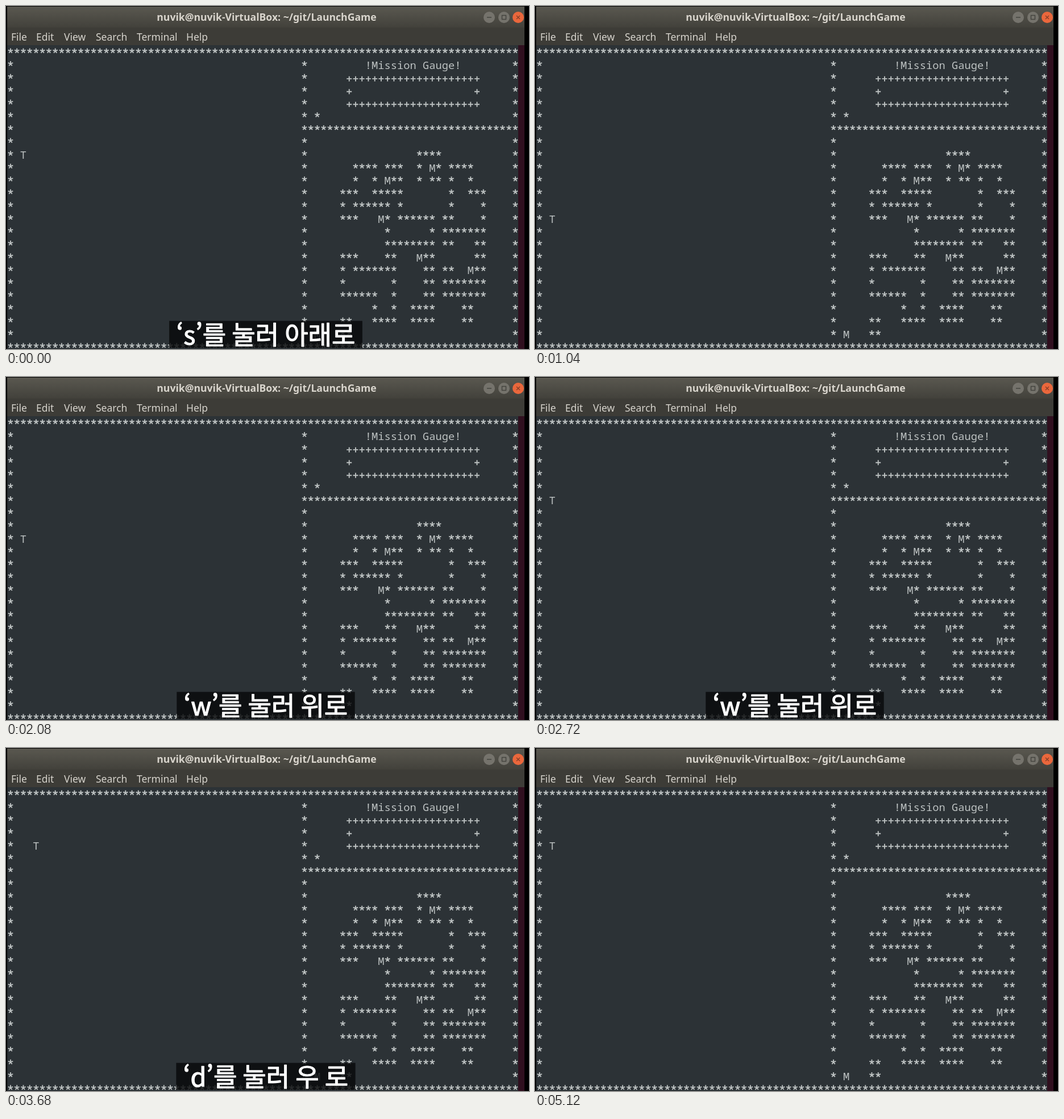
Recreate the animation shown at these times as an HTML page with a canvas. Size 920 by 604 pixels, loop 5.2 s.

```html
<!DOCTYPE html>
<html lang="ko">
<head>
<meta charset="utf-8">
<title>Terminal game</title>
<style>
  html, body { margin: 0; width: 100%; height: 100%; overflow: hidden; background: #000; }
  canvas { display: block; filter: blur(.65px); }
</style>
</head>
<body>
<canvas id="stage" width="920" height="612"></canvas>
<script>
const LOOP = 5200, COL = 11.24, ROW = 22.57;
const INK = '#bcc1c1';

// Rows 8 to 22 of the map, starting at column 52
const MAP = [
  '            ****',
  '  **** ***  * M* ****',
  '  *  * M**  * ** *  *',
  '***  *****       *  ***',
  '* ****** *       *    *',
  '***   M* ****** **    *',
  '       *      * *******',
  '       ******** **   **',
  '***    **   M**      **',
  '* *******    ** **  M**',
  '*       *    ** *******',
  '******  *    ** *******',
  '     *  *  ****    **',
  '**   ****  ****    **',
  '**',
];

// Key presses: time, column step, row step
const MOVES = [
  ...[160, 320, 480, 720, 960, 1120].map(t => [t, 0, 1]),
  ...[1280, 1520, 1760, 1920, 2080, 2320, 2560, 2720, 2880, 3120].map(t => [t, 0, -1]),
  ...[3360, 3520, 3920].map(t => [t, 1, 0]),
  ...[4320, 4480, 4720].map(t => [t, -1, 0]),
];

const CAPTIONS = [
  [0, 1040, '‘s’를 눌러 아래로'],
  [1680, 2960, '‘w’를 눌러 위로'],
  [3680, 4320, '‘d’를 눌러 우 로'],
  [4320, 5040, '‘a’를 눌러 좌 로'],
];

const ctx = document.getElementById('stage').getContext('2d');

function rect(x, y, w, h, fill) {
  ctx.fillStyle = fill;
  ctx.fillRect(x, y, w, h);
}

function text(str, x, y, font, fill, align = 'left') {
  ctx.font = font;
  ctx.fillStyle = fill;
  ctx.textAlign = align;
  ctx.fillText(str, x, y);
}

// Asterisk (5 arms) or plus (4 arms)
function arms(x, y, n) {
  ctx.beginPath();
  for (let i = 0; i < n; i++) {
    const a = (i * 2 / n - 0.5) * Math.PI;
    ctx.moveTo(x, y);
    ctx.lineTo(x + 4.5 * Math.cos(a), y + 4.5 * Math.sin(a));
  }
  ctx.strokeStyle = INK;
  ctx.lineWidth = 1.9;
  ctx.stroke();
}

function put(str, col, row) {
  [...str].forEach((ch, i) => {
    const x = 8 + (col + i) * COL, y = 79 + row * ROW;
    if (ch === '*') arms(x, y, 5);
    else if (ch === '+') arms(x, y + 4, 4);
    else if (ch !== ' ') text(ch, x, y + 9.4, '500 18.7px "Noto Sans Mono", monospace', INK, 'center');
  });
}

function button(x, fill, mark, path) {
  ctx.fillStyle = fill;
  ctx.beginPath();
  ctx.arc(x, 20, 10, 0, 7);
  ctx.fill();
  ctx.strokeStyle = mark;
  ctx.lineWidth = 1.5;
  ctx.stroke(new Path2D(path));
}

function drawWindow() {
  rect(0, 0, 920, 612, '#000');
  const bar = ctx.createLinearGradient(0, 1, 0, 38);
  bar.addColorStop(0, '#5a5850');
  bar.addColorStop(1, '#42413b');
  rect(2, 1, 910, 37, bar);
  rect(2, 38, 910, 31, '#3d3c37');
  rect(2, 69, 899, 543, '#2c3236');
  rect(901, 69, 11, 543, '#30101f');

  text('nuvik@nuvik-VirtualBox: ~/git/LaunchGame', 458.5, 26,
    'bold 17.6px "Noto Sans", sans-serif', '#d9d5cd', 'center');
  const menu = { File: 9, Edit: 53, View: 102, Search: 158, Terminal: 230, Help: 317 };
  for (const name in menu)
    text(name, menu[name], 61, '500 17.5px "Noto Sans", sans-serif', '#d6d3cc');

  button(850, '#75736c', '#45443f', 'M846 20h8');
  button(876, '#75736c', '#45443f', 'M872.5 16.5h7v7h-7z');
  button(901, '#ea673c', '#8a4028', 'M898 17l6 6m0-6l-6 6');
}

function drawBoard() {
  put('*'.repeat(80), 0, 0);
  put('*'.repeat(80), 0, 23);
  for (let r = 1; r < 23; r++)
    for (const c of [0, 46, 79]) put('*', c, r);
  put('*'.repeat(32), 47, 6);
  put('!Mission Gauge!', 56, 1);
  put('+'.repeat(21), 53, 2);
  put('+' + ' '.repeat(19) + '+', 53, 3);
  put('+'.repeat(21), 53, 4);
  put('*', 48, 5);
  MAP.forEach((line, i) => put(line, 52, 8 + i));
  put('M', 48, 22);
}

function drawCaption(str) {
  const font = '45px "Noto Sans CJK KR", "Noto Sans CJK", sans-serif';
  ctx.font = font;
  const w = ctx.measureText(str).width + 25;
  rect(457 - w / 2, 554.5, w, 47.5, 'rgba(8,9,10,.82)');
  text(str, 457, 596, font, '#fff', 'center');
  // A thin outline gives the medium weight
  ctx.strokeStyle = '#fff';
  ctx.lineWidth = 1.2;
  ctx.lineJoin = 'round';
  ctx.strokeText(str, 457, 596);
}

function draw(now) {
  const t = now % LOOP;
  let col = 2, row = 8;
  for (const [at, dx, dy] of MOVES)
    if (t >= at) { col += dx; row += dy; }
  drawWindow();
  drawBoard();
  put('T', col, row);
  for (const [from, to, str] of CAPTIONS)
    if (t >= from && t < to) drawCaption(str);
}

const start = performance.now();
function tick() {
  draw(performance.now() - start);
  requestAnimationFrame(tick);
}
tick();
</script>
</body>
</html>
```
